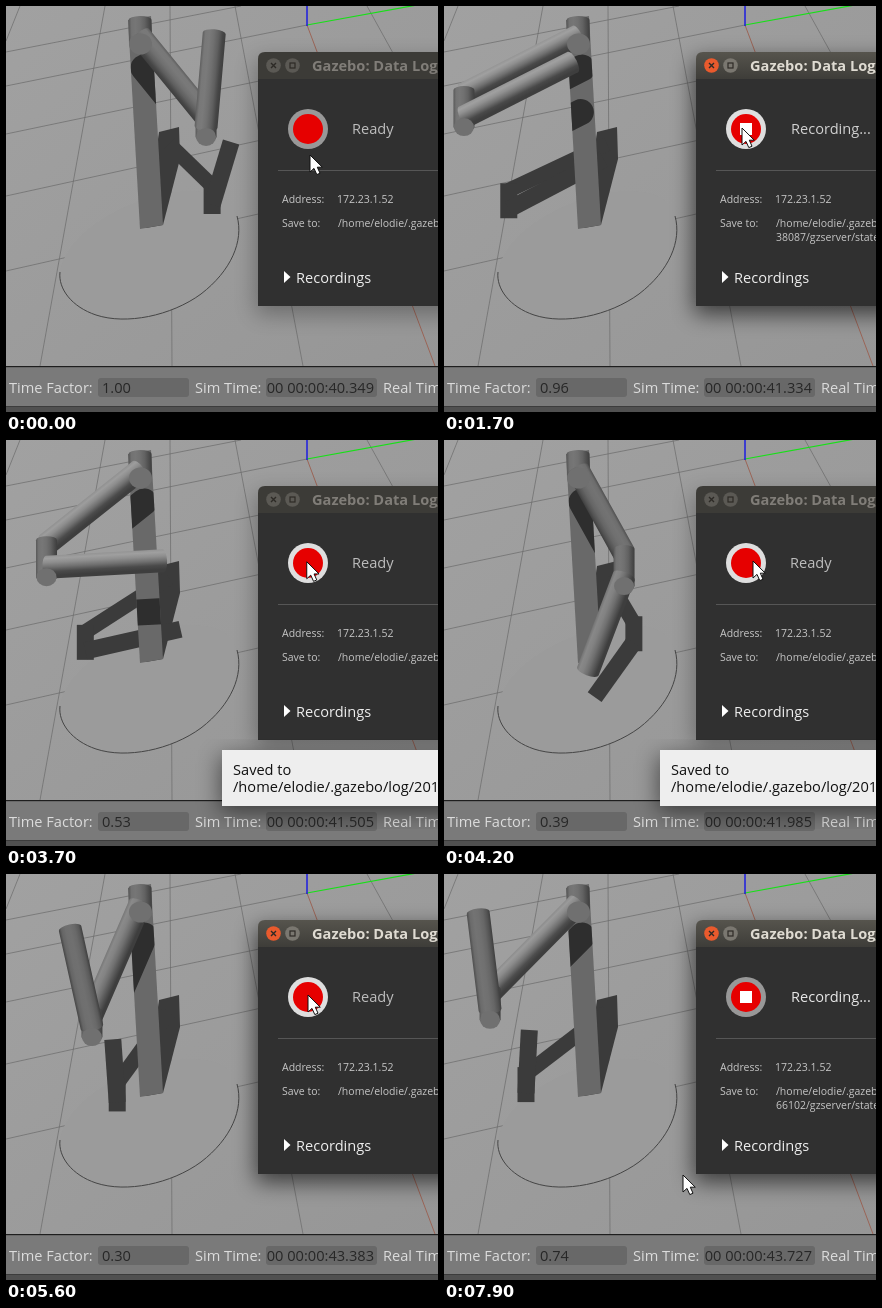
Write an HTML page that moves like this. It is 432 px wide and 406 px high and loops after 8 s.

```html
<!DOCTYPE html>
<html lang="en">
<head>
<meta charset="utf-8">
<title>Pendulum simulation</title>
<style>
html, body { margin: 0; width: 100%; height: 100%; overflow: hidden; background: #9a9a9a; }
svg { display: block; width: 432px; height: 406px; }
text { font-family: "Open Sans", "Noto Sans", sans-serif; font-size: 14.6px; white-space: pre; }
.small { font-size: 10.5px; fill: #c6c6c6; }
.bar { fill: #dcdcdc; }
.value { fill: #272727; }
.grid { stroke: #6a6a6a; stroke-width: .7; fill: none; }
.shade { stroke: #3b3b3b; fill: none; }
.patch { stroke: #2e2e2e; fill: none; stroke-linecap: round; }
</style>
</head>
<body>
<svg id="stage" viewBox="0 0 432 406">
  <defs id="defs">
    <linearGradient id="floor" x1="0" y1="0" x2="1" y2="1">
      <stop offset="0" stop-color="#a1a1a1"/><stop offset="1" stop-color="#969696"/>
    </linearGradient>
    <linearGradient id="titleOn" x2="0" y2="1">
      <stop offset="0" stop-color="#56544d"/><stop offset="1" stop-color="#3d3c38"/>
    </linearGradient>
    <filter id="blur" x="-30%" y="-30%" width="160%" height="160%"><feGaussianBlur stdDeviation="11"/></filter>
    <clipPath id="poleClip"><path d="M122 14 145 10 157 219 134 223Z"/></clipPath>
    <clipPath id="simClip"><rect x="261" y="370" width="110" height="24"/></clipPath>
  </defs>

  <rect width="432" height="361" fill="url(#floor)"/>
  <path class="grid" d="M14 0 0 35M99 0 34 360M164 0 166 360M229 0 297 360M361 0 560 360"/>
  <path class="grid" d="M0 46 235 0M0 80 301 19M0 128 301 65M0 190 301 124M0 265 301 197"/>
  <path d="M301 19 429 360" stroke="#9b5f50" stroke-width=".9"/>
  <path d="M301 19 411 -1" stroke="#18e018" stroke-width="1.2"/>
  <path d="M301 0V20" stroke="#1414e6" stroke-width="1.4"/>
  <path d="M54 266C52 283 66 301 90 309C120 319 165 310 195 288C225 265 238 235 231 210C226 190 205 184 180 185C130 188 62 222 54 266Z"
        fill="#9b9b9b"/>
  <path d="M54 266C52 283 66 301 90 309C120 319 165 310 195 288C225 265 238 235 231 210"
        fill="none" stroke="#454545" stroke-width="1"/>

  <path d="M153 126 173 121 174 153 157 219 140 222Z" fill="#3b3b3b"/>
  <path class="shade" id="shadowUpper" stroke-width="15"/>
  <path class="shade" id="shadowJoint" stroke-width="17"/>
  <path class="shade" id="shadowLower" stroke-width="17"/>

  <path d="M122 14 145 10 157 219 134 223Z" fill="#696969"/>
  <g clip-path="url(#poleClip)">
    <path class="patch" id="patchUpper" stroke-width="27"/>
    <path class="patch" id="patchLower" stroke-width="26"/>
  </g>
  <g id="arm"></g>

  <rect y="360" width="432" height="46" fill="#7a7a7a"/>
  <rect y="360" width="432" height="1.2" fill="#1e1e1e"/>
  <rect y="400" width="432" height="6" fill="#505050"/>
  <rect y="400" width="432" height="1" fill="#3c3c3c"/>
  <rect x="92" y="372" width="91" height="19" rx="3" fill="#686868"/>
  <rect x="260" y="372" width="111" height="19" rx="3" fill="#686868"/>
  <text class="bar" x="3" y="387">Time Factor:</text>
  <text class="value" id="factor" x="96" y="387"></text>
  <text class="bar" x="189" y="387">Sim Time:</text>
  <g clip-path="url(#simClip)"><text class="value" id="sim" x="368" y="387" text-anchor="end"></text></g>
  <text class="bar" x="377" y="387">Real Time:</text>

  <rect id="glow" x="250" y="54" width="240" height="254" filter="url(#blur)"/>
  <path id="titleBar" d="M252 74V53Q252 46 259 46H432V74Z"/>
  <rect x="252" y="73" width="180" height="227" fill="#303030"/>
  <circle id="close" cx="267.5" cy="59.5" r="7.3"/>
  <path d="M265 57l5 5M270 57l-5 5" stroke="#2d2a26" stroke-width="1.4"/>
  <circle id="maximize" cx="286.5" cy="59.5" r="7.3"/>
  <rect x="284" y="57" width="5" height="5" fill="none" stroke="#2d2a26" stroke-width="1.2"/>
  <text id="title" x="306" y="65" font-weight="700">Gazebo: Data Logger</text>

  <circle id="ring" cx="302" cy="123" r="20"/>
  <circle cx="302" cy="123" r="15" fill="#e60000"/>
  <rect id="stop" x="296" y="117" width="12" height="12" fill="#fff"/>
  <text id="status" x="346" y="128"></text>
  <path d="M272 164.5H432" stroke="#565656"/>
  <text class="small" x="276" y="197">Address:</text>
  <text class="small" x="331" y="197">172.23.1.52</text>
  <text class="small" x="276" y="221">Save to:</text>
  <text class="small" x="332" y="221">/home/elodie/.gazebo/log</text>
  <text class="small" id="path" x="332" y="235"></text>
  <path d="M278 265 284.500 271 278 277Z" fill="#fff"/>
  <text x="290" y="277" fill="#eee">Recordings</text>

  <g id="popup">
    <rect x="214" y="316" width="260" height="56" filter="url(#blur)" opacity=".5"/>
    <rect x="216" y="310" width="216" height="56" fill="#eee"/>
    <text x="227" y="335" fill="#111">Saved to</text>
    <text x="227" y="352" fill="#111">/home/elodie/.gazebo/log/2016</text>
  </g>
  <path id="cursor" d="M0 0V17L4 13.400 6.800 19.600 10 18.200 7.300 12.200H12.300Z" fill="#fff" stroke="#111" stroke-width="1"/>
</svg>
<script>
const LOOP = 8000, STEP = 100;
const PIVOT = [134, 30];
const $ = id => document.getElementById(id);

// Real time (s) against simulated seconds, time factor and cursor position.
const SIM = [[0, 40.349], [.9, 41.25], [1, 41.31], [1.7, 41.334], [3.1, 41.376],
  [3.58, 41.39], [4.2, 41.985], [5, 42.783], [5.6, 43.383], [5.9, 43.676], [7.9, 43.727]];
const FACTOR = [[0, 1], [1.7, .96], [3.1, .69], [4.2, .39], [5, .17], [5.6, .3], [7.9, .74]];
const CURSOR = [[0, 304, 149], [.1, 304, 149], [.5, 298, 122], [3.6, 298, 122], [4, 309, 121],
  [4.4, 309, 121], [4.8, 297, 144], [5.1, 297, 144], [5.4, 302, 121], [6.5, 302, 121], [7.2, 239, 301]];

// Sim time, then angle, rate and length of the upper and lower link, then joint depth.
// Angles are degrees from straight down, positive to the right.
const POSES = [
  [40.349, 39.2, -130, 104.5, 175, -10, 94, 20],
  [41.334, -63, 0, 128, 116.8, -90, 122, 33],
  [41.985, 29, 130, 95, -20.8, -250, 102, 33],
  [42.783, 69.6, -100, 109, -116.8, -130, 97.5, 28],
  [43.383, -23.4, -130, 121, -167.5, -30, 101, 22],
  [43.727, -44.7, -30, 125, -173, -5, 98, 27]
];

function segment(keys, t) {
  let i = 0;
  while (i < keys.length - 2 && t >= keys[i + 1][0]) i++;
  const [a, b] = [keys[i], keys[i + 1]];
  const span = b[0] - a[0];
  return { a, b, span, s: Math.min(1, Math.max(0, (t - a[0]) / span)) };
}

function lerpKeys(keys, t, col = 1) {
  const { a, b, s } = segment(keys, t);
  return a[col] + (b[col] - a[col]) * s;
}

function hermite(keys, t, col) {
  const { a, b, span, s } = segment(keys, t);
  const s2 = s * s, s3 = s2 * s;
  return (2 * s3 - 3 * s2 + 1) * a[col] + (s3 - 2 * s2 + s) * span * a[col + 1]
    + (3 * s2 - 2 * s3) * b[col] + (s3 - s2) * span * b[col + 1];
}

function polar([x, y], degrees, length) {
  const a = degrees * Math.PI / 180;
  return [x + Math.sin(a) * length, y + Math.cos(a) * length];
}

const shift = ([x, y], dx, dy) => [x + dx, y + dy];
const line = (id, p, q) => $(id).setAttribute("d", `M${p}L${q}`);
const set = (id, attrs) => Object.entries(attrs).forEach(([k, v]) => $(id).setAttribute(k, v));

function add(parent, tag, attrs) {
  const el = document.createElementNS("http://www.w3.org/2000/svg", tag);
  for (const k in attrs) el.setAttribute(k, attrs[k]);
  return parent.appendChild(el);
}

// A lit cylinder: the shade of each band follows its normal.
function cylinder(name, r) {
  const bands = [-1, -.75, -.4, 0, .4, .75, 1];
  const gradient = add($("defs"), "linearGradient", { id: name, x1: 0, y1: 0, x2: 0, y2: 1 });
  const stops = bands.map(u => add(gradient, "stop", { offset: (u + 1) / 2 }));
  const body = add($("arm"), "path", { fill: `url(#${name})` });
  return (p, q) => {
    const dx = q[0] - p[0], dy = q[1] - p[1];
    const angle = Math.atan2(dy, dx), length = Math.hypot(dx, dy);
    const light = .25 * Math.sin(angle) - .8 * Math.cos(angle);
    bands.forEach((u, i) => {
      const v = Math.round(62 + 105 * Math.max(0, u * light + .48 * Math.sqrt(1 - u * u)));
      stops[i].setAttribute("stop-color", `rgb(${v},${v},${v})`);
    });
    body.setAttribute("d", `M0 ${-r}H${length}A4 ${r} 0 0 1 ${length} ${r}H0A4 ${r} 0 0 1 0 ${-r}Z`);
    body.setAttribute("transform", `translate(${p}) rotate(${angle * 180 / Math.PI})`);
  };
}

const cap = (rx, ry) => add($("arm"), "ellipse", { rx, ry, fill: "#707070" });
const drawPivot = cylinder("pivot", 11.5);
const drawUpper = cylinder("upper", 11.5);
const pivotCap = cap(11.5, 10.5);
const drawJoint = cylinder("joint", 10.5);
const drawLower = cylinder("lower", 11.5);
const jointCap = cap(10, 9);

// Floor shadow of a point in the swing plane.
function cast([x, y], depth = 0) {
  const dx = x - PIVOT[0], dy = y - PIVOT[1];
  return [163 + .8 * dx - .12 * dy, 138 - .1 * dx + .6 * dy + depth];
}

function drawArm(sim) {
  const back = polar(PIVOT, hermite(POSES, sim, 1), lerpKeys(POSES, sim, 3));
  const depth = lerpKeys(POSES, sim, 7);
  const front = shift(back, 0, depth);
  const hinge = shift(front, 0, -10);
  const tip = polar(hinge, hermite(POSES, sim, 4), lerpKeys(POSES, sim, 6));

  drawPivot([134, 14], [134.5, 38]);
  pivotCap.setAttribute("transform", "translate(134.5 38)");
  drawUpper(PIVOT, back);
  drawJoint(shift(back, 0, -4), front);
  drawLower(hinge, tip);
  jointCap.setAttribute("transform", `translate(${front})`);

  line("shadowUpper", cast(PIVOT), cast(back));
  line("shadowJoint", cast(back, -7), cast(back, 28));
  line("shadowLower", cast(back, 19), cast(shift(tip, 0, -depth), 19));
  line("patchUpper", shift(PIVOT, 4, 32), shift(back, 4, 32));
  line("patchLower", shift(hinge, 8, 50), shift(tip, 8, 50));
}

function drawDialog(t, cursor) {
  const focused = (t >= .8 && t < 3.5) || t >= 5.5;
  const started = t >= 5.9 ? 5.9 : t >= .9 && t < 3.5 ? .9 : null;
  const recording = started !== null;
  const hover = Math.hypot(cursor[0] - 302, cursor[1] - 123) < 20;
  const glow = Math.round(215 + 40 * Math.cos(2 * Math.PI * (t - started) / 1.1));

  set("glow", { opacity: focused ? .62 : .3 });
  set("titleBar", { fill: focused ? "url(#titleOn)" : "#3c3b37" });
  set("title", { fill: focused ? "#dfdbd2" : "#807d78" });
  set("close", { fill: focused ? "#e95a2d" : "#5b5954" });
  set("maximize", { fill: focused ? "#7a7770" : "#5b5954" });
  set("ring", { fill: hover ? "#dedede" : "#989898" });
  set("stop", { visibility: recording ? "visible" : "hidden" });
  set("status", { x: recording ? 347 : 346, fill: recording ? `rgb(${glow},${glow},${glow})` : "#bdbdbd" });
  $("status").textContent = recording ? "Recording..." : "Ready";
  $("path").textContent = recording ? (t < 4 ? "38087" : "66102") + "/gzserver/state.log" : "";
  set("popup", { visibility: t >= 3.5 && t < 5.5 ? "visible" : "hidden" });
}

function render(ms) {
  const t = Math.floor(ms % LOOP / STEP) * STEP / 1000;
  const sim = lerpKeys(SIM, t);
  const cursor = [lerpKeys(CURSOR, t, 1), lerpKeys(CURSOR, t, 2)];
  drawArm(sim);
  drawDialog(t, cursor);
  $("factor").textContent = lerpKeys(FACTOR, t).toFixed(2);
  $("sim").textContent = "00 00:00:" + sim.toFixed(3);
  set("cursor", { transform: `translate(${cursor})` });
}

const start = performance.now();
function tick() {
  render(performance.now() - start);
  requestAnimationFrame(tick);
}
tick();
</script>
</body>
</html>
```
